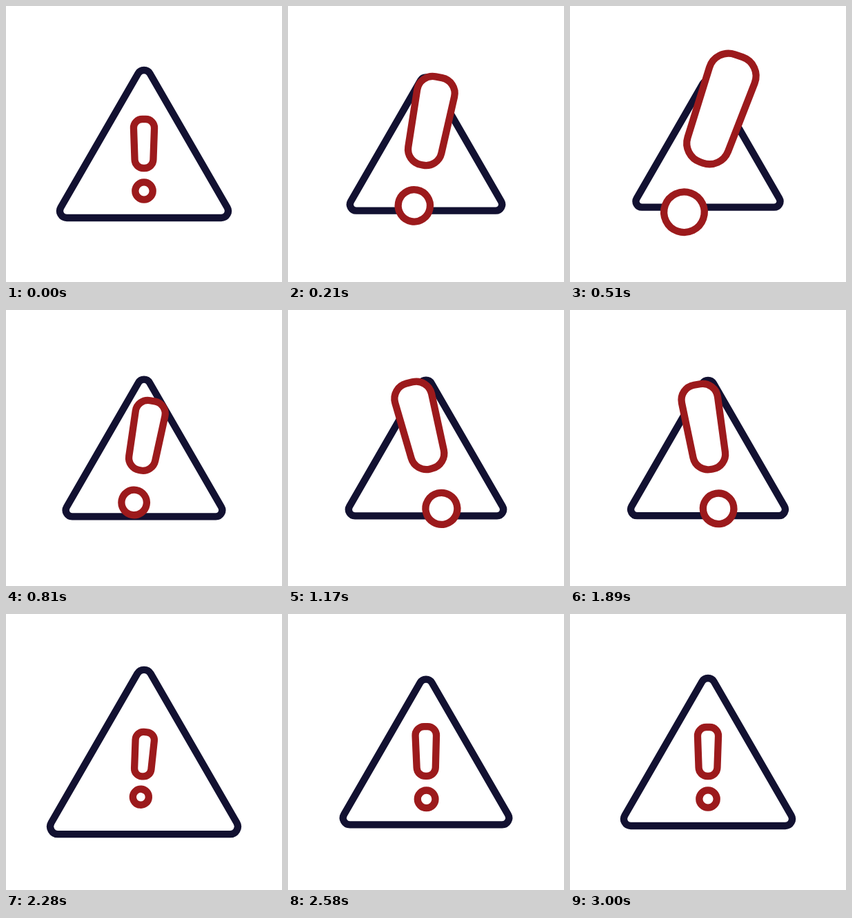
An HTML page with a canvas that plays this animation: 400 px wide and 400 px high, repeating every 5030 ms.

```html
<!DOCTYPE html>
<html lang="en">
<head>
<meta charset="utf-8">
<title>Warning sign</title>
<style>
  html, body { margin: 0; width: 100%; height: 100%; overflow: hidden; background: #fff; }
  canvas { display: block; }
</style>
</head>
<body>
<canvas id="stage" width="400" height="400"></canvas>
<script>
const ctx = document.getElementById('stage').getContext('2d');
const LOOP = 5030, STEP = 30;
const RELEASE = 1600, OVERSHOOT = 2210, UNDERSHOOT = 2540, REST = 3000;
const NAVY = '#121131', RED = '#9c1a1c';

// Eased 0 to 1 between two times.
function ramp(t, from, to) {
  const x = Math.min(1, Math.max(0, (t - from) / (to - from)));
  return x < .5 ? (2 * x) ** 2.4 / 2 : 1 - (2 - 2 * x) ** 2.4 / 2;
}

// Rises to 1, relaxes partly, rises to 1 again, then lets go.
function doublePulse(t, peak, dip, secondPeak, release, relax) {
  return ramp(t, 0, peak) - relax * (ramp(t, peak, dip) - ramp(t, dip, secondPeak))
    - ramp(t, release, OVERSHOOT);
}

// Swings past the rest pose, a little back below it, and settles.
function rebound(t) {
  return ramp(t, RELEASE + 100, OVERSHOOT) - 1.12 * ramp(t, OVERSHOOT, UNDERSHOOT)
    + .12 * ramp(t, UNDERSHOOT, REST);
}

const triangleScale = t =>
  1 - .15 * doublePulse(t, 370, 1000, 1450, RELEASE + 100, .62) + .123 * rebound(t);

const markScale = t =>
  1 + 1.4 * doublePulse(t, 390, 870, 1530, RELEASE, .7) - .1 * rebound(t);

const markAngle = t =>
  19.5 * (ramp(t, 0, 400) - 2 * ramp(t, 430, 1470) + ramp(t, RELEASE, OVERSHOOT)) + 4.4 * rebound(t);

// Symmetric shape with a flat base; widths are half widths.
function roundedShape(topWidth, top, baseWidth, base, radius, scale) {
  const corners = [[topWidth, top], [baseWidth, base], [-baseWidth, base]];
  if (topWidth) corners.push([-topWidth, top]);
  ctx.beginPath();
  ctx.moveTo(-(topWidth + baseWidth) / 2 * scale, (top + base) / 2 * scale);
  if (topWidth) ctx.lineTo(-(topWidth + baseWidth) / 2 * scale, (top + base) / 2 * scale);
  const path = topWidth ? [corners[3], ...corners.slice(0, 3)] : corners;
  path.forEach(([x, y], i) => {
    const [nextX, nextY] = path[(i + 1) % path.length];
    ctx.arcTo(x * scale, y * scale, nextX * scale, nextY * scale, radius * scale);
  });
  ctx.closePath();
}

function paint(color) {
  ctx.strokeStyle = color;
  ctx.fill();
  ctx.stroke();
}

function draw(t) {
  const scale = markScale(t);
  ctx.setTransform(1, 0, 0, 1, 0, 0);
  ctx.fillStyle = '#fff';
  ctx.fillRect(0, 0, 400, 400);
  ctx.lineWidth = 10.3;
  ctx.translate(200, 200);

  roundedShape(0, -117, 129.3, 107, 10, triangleScale(t));
  paint(NAVY);

  // The mark turns about the centre but grows from the foot of its bar.
  ctx.rotate(markAngle(t) * Math.PI / 180);
  ctx.translate(0, 40);
  roundedShape(15.5, -76, 13, -5, 12.5, scale);
  paint(RED);

  ctx.beginPath();
  ctx.arc(0, 28 * scale, 12.7 * scale, 0, Math.PI * 2);
  paint(RED);
}

const start = performance.now();
function frame() {
  const time = (performance.now() - start) % LOOP;
  draw(Math.floor(time / STEP) * STEP);
  requestAnimationFrame(frame);
}
frame();
</script>
</body>
</html>
```
